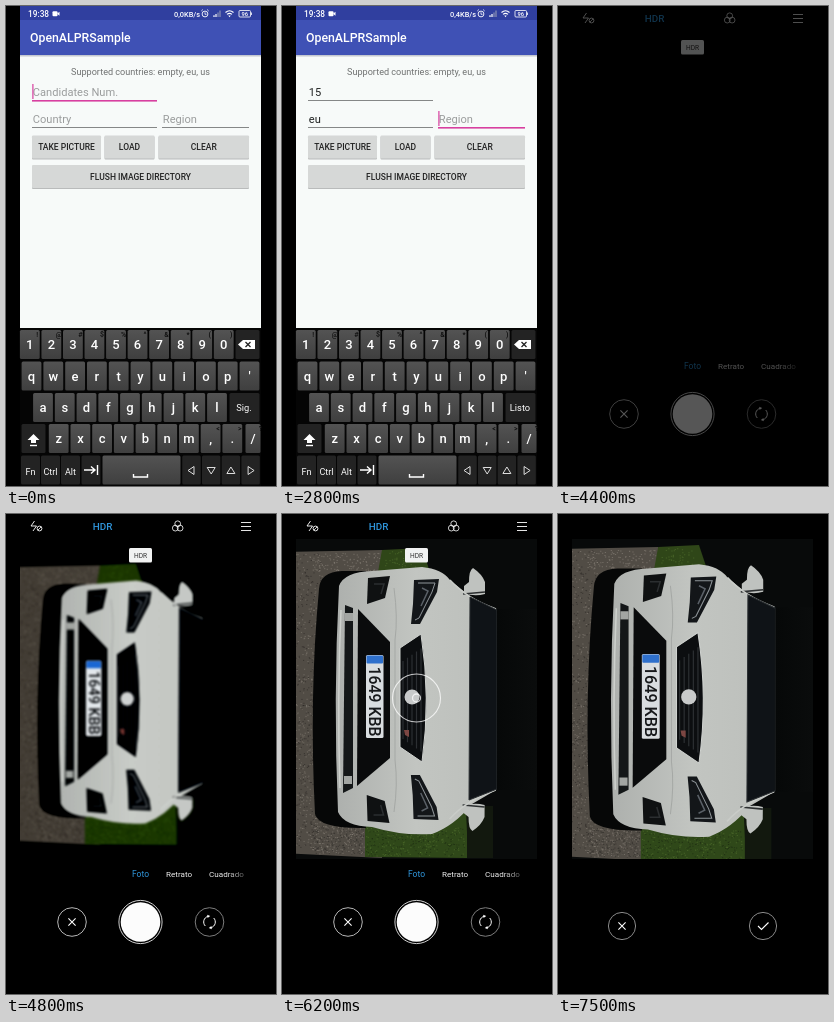
Write an HTML page that moves like this. It is 270 by 480 pixels and loops after 8000 ms.

```html
<!DOCTYPE html>
<html lang="en">
<head>
<meta charset="utf-8">
<title>Plate reader demo</title>
<style>
html, body { margin: 0; width: 100%; height: 100%; overflow: hidden; background: #000; }
svg { display: block; width: 100%; height: 100%; font-family: Roboto, "Noto Sans", sans-serif; }
</style>
</head>
<body>
<svg id="stage" viewBox="0 0 270 480" xmlns="http://www.w3.org/2000/svg"></svg>
<script>
const LOOP = 8000;
const PINK = '#d83fa0', BLUE = '#2f96dc';

const clamp = v => Math.max(0, Math.min(1, v));
const ramp = (t, a, b) => clamp((t - a) / (b - a));
const mix = (a, b, k) => a + (b - a) * k;
const smooth = k => k * k * (3 - 2 * k);

let seed = 7;
const rand = () => (seed = seed * 16807 % 2147483647) / 2147483647;

const rect = (x, y, w, h, fill, more = '') =>
  `<rect x="${x}" y="${y}" width="${w}" height="${h}" fill="${fill}" ${more}/>`;
const text = (x, y, s, size, fill, more = '') =>
  `<text x="${x}" y="${y}" font-size="${size}" fill="${fill}" ${more}>${s}</text>`;
const mid = (x, y, s, size, fill, more = '') => text(x, y, s, size, fill, 'text-anchor="middle" ' + more);
const shape = (d, fill, more = '') => `<path d="${d}" fill="${fill}" ${more}/>`;
const line = (d, stroke, w = 1, more = '') => shape(d, 'none', `stroke="${stroke}" stroke-width="${w}" ${more}`);
const ring = (x, y, r, stroke, w = 1, more = '') =>
  `<circle cx="${x}" cy="${y}" r="${r}" fill="none" stroke="${stroke}" stroke-width="${w}" ${more}/>`;
const group = (id, body, more = '') => `<g id="${id}" ${more}>${body}</g>`;
const bold = 'font-weight="500"';

function specks(n, x, y, w, h, color) {
  let d = '';
  for (let i = 0; i < n; i++) d += `M${(x + rand() * w).toFixed(1)} ${(y + rand() * h).toFixed(1)}h1.2`;
  return line(d, color, 1, 'opacity=".55"');
}

// Form screen
function button(x, y, w, h, label) {
  return rect(x, y + 1, w, h, '#b9bbbb', 'rx="1"') + rect(x, y, w, h, '#d6d8d7', 'rx="1"') +
    mid(x + w / 2, y + h / 2 + 3.2, label, 8.5, '#222', bold);
}

const fields = [
  { x: 26, y: 94, w: 125, hint: 'Candidates Num.' },
  { x: 26, y: 121, w: 125, hint: 'Country' },
  { x: 156, y: 121, w: 87, hint: 'Region' }
];

const field = (f, i) =>
  text(f.x + .8, f.y - 4.5, f.hint, 11.1, '#9b9d9d', `id="value${i}"`) +
  rect(f.x, f.y, f.w, 1, '#858787', `id="under${i}"`);

const form = () =>
  rect(14, 0, 300, 480, '#f7faf9') + rect(14, 0, 300, 14, '#303f9f') + rect(14, 14, 300, 35, '#3f51b5') +
  rect(14, 49, 300, 1.5, '#c4c8d0') +
  text(24, 36, 'OpenALPRSample', 12.3, '#fff', bold) +
  mid(134.5, 69, 'Supported countries: empty, eu, us', 9.1, '#707272') +
  fields.map(field).join('') +
  rect(26, 78, 1.2, 15, PINK, 'id="cursor"') +
  button(26, 129.5, 69, 23, 'TAKE PICTURE') + button(98.5, 129.5, 50, 23, 'LOAD') +
  button(152.5, 129.5, 90.5, 23, 'CLEAR') + button(26, 159, 217, 23, 'FLUSH IMAGE DIRECTORY') +
  group('result', rect(14, 185, 300, 12, '#0e80e6') + text(61, 194, 'Confidence', 9.1, '#12202c'));

// Keyboard
function key(x, y, w, label, o = {}) {
  return rect(x - w / 2, y, w, 29, o.dark ? '#232323' : 'url(#keyFill)', `rx="1.5" ${o.id ? `id="${o.id}"` : ''}`) +
    mid(x, y + 19, label, o.size || 13, '#fff', o.size ? '' : bold) +
    (o.alt ? mid(x + 7.5, y + 6.5, o.alt, 7, '#0c0c0c', bold) : '');
}

const esc = c => ({ '&': '&amp;', '<': '&lt;', '>': '&gt;' })[c] || c;
const row = (chars, x, y, step, alts = '') => [...chars].map((c, i) =>
  key(x + i * step, y, 19.8, c, { id: 'key' + c.charCodeAt(0), alt: esc(alts[i] || '') })).join('');

function keyboard() {
  const small = { dark: true, size: 9 };
  const arrows = ['-3.5 0l6-4v8z', '-4 -3h8l-4 6.5z', '-4 3h8l-4-6.5z', '3.5 0l-6-4v8z'];
  return rect(14, 322, 241, 158, '#050505') +
    row('1234567890', 23.8, 324, 21.55, '!@#$%^&*()') + key(241.5, 324, 24, '', { dark: true }) +
    shape('M232 338.5l5-4.5h12v9h-12z', '#fff') + line('M239.5 336l5 5m0-5l-5 5', '#222', 1.3) +
    row("qwertyuiop'", 25.5, 355.5, 21.8) +
    row('asdfghjkl', 37, 387, 21.75) + key(238.5, 387, 30, '', small) +
    mid(238, 405, 'Sig.', 9.3, '#fff', 'id="action"') +
    key(27.5, 418, 24, '', { dark: true }) + shape('M27.5 428l6 6h-3.5v3h-5v-3h-3.5z', '#fff') +
    line('M24 439.5h7', '#fff', 1.4) +
    row('zxcvbnm,.', 52.7, 418, 21.7, '       <>') + key(247, 418, 15, '/', { alt: '?' }) +
    key(24.5, 449.5, 19, 'Fn', small) + key(44.5, 449.5, 19, 'Ctrl', small) +
    key(64.5, 449.5, 19, 'Alt', small) + key(85, 449.5, 19, '', small) +
    line('M78 464h11m-4-3.5l4 3.5l-4 3.5M91.5 459v10', '#fff', 1.4) +
    key(135.5, 449.5, 78, '') + line('M127.5 468v3h14v-3', '#fff', 1.4) +
    arrows.map((a, i) => key(185.5 + i * 19.7, 449.5, 18.5, '', small) +
      line('M' + a, '#ddd', 1, `transform="translate(${185.5 + i * 19.7} 464.5)"`)).join('');
}

const statusBar = () =>
  text(22, 10.7, '19:38', 8.3, '#fff', bold) +
  rect(46.5, 5.2, 5, 5, '#fff', 'rx="1"') + shape('M51 7.7l2.5-2v4z', '#fff') +
  text(168, 10.5, '', 7.4, '#fff', bold + ' id="speed"') +
  ring(199, 8, 2.9, '#fff', .9) + line('M199 6.3v2h1.5M195.3 5l1.6-1.5M202.7 5l-1.6-1.5', '#fff', .8) +
  line('M208 11v-1.8M210 11v-3', '#fff', 1.2) + line('M212 11v-4.6M214 11v-6.5', '#8c92b4', 1.2) +
  line('M219.5 6.5q4-3.5 8 0M221 8.4q2.5-2 5 0', '#fff', 1.1) + shape('M222.3 9.6h2.4l-1.2 1.6z', '#fff') +
  line('M234 4.5h9.5q1 0 1 1v4.5q0 1-1 1h-9.5q-1 0-1-1v-4.5q0-1 1-1zM245.5 6.5v2.5', '#fff', .8) +
  mid(238.8, 9.9, '96', 5.8, '#fff', bold);

// Car seen through the camera, lying on its side
function corner(flip) {
  const body = shape('M132 66L157 65L155 78L138 110L129 110L131 90Z', '#131619') +
    line('M136 69L153 69L150 78L137 104L133 106', '#8f9599', 1) +
    line('M140 74l6 3l-7 15', '#5a6067', 1.5) +
    shape('M86 64L108 62L103 84L85 90Z', '#0f1112') + line('M92 70h10l-3 10', '#2b2e30', 1.5) +
    shape('M182 72L187 68Q187 56 191 54Q200 60 203 68L203 80Q192 83 182 79Z', '#bfc2bf') +
    line('M181 80l22-2', '#2c2f30', 1.5) +
    line('M168 66Q184 84 214 95', '#c9ccc8', 1.5);
  return flip ? `<g transform="matrix(1 0 .008 -1 -1 371)">${body}</g>` : body;
}

function scene() {
  let slots = '';
  for (let x = 121; x < 141; x += 4.5) slots += `M${x} ${147 - (x - 121) * .7}V${225 + (x - 121) * .7}`;
  return rect(-40, -20, 360, 420, '#080a0a') +
    shape('M-40 39L100 36V344L-40 337Z', '#514c45') +
    specks(700, -20, 40, 60, 297, '#8a847a') + specks(700, -20, 40, 60, 297, '#25221f') +
    specks(160, 30, 312, 52, 28, '#8f887e') + specks(160, 30, 312, 52, 28, '#2b2825') +
    specks(110, 30, 39, 68, 18, '#8f887e') +
    shape('M100 36L140 34L148 58H96Z', '#2f4618') +
    shape('M83 308H160L184 292L186 344L83 343Z', '#2f4819') +
    specks(170, 84, 314, 98, 28, '#567630') + specks(170, 84, 314, 98, 28, '#182610') +
    specks(40, 102, 37, 34, 16, '#567630') +
    shape('M185 292H211V344H185Z', '#12180e') +
    shape('M60 57Q38 58 37 75Q27 182 33 300Q37 315 84 314V57Z', '#060707') +
    shape('M57 72Q62 58 90 57L140 53Q160 55 168 66L190 84L214 96V276L190 290Q172 312 150 320Q120 322 90 313Q62 312 56 298Q51 185 57 72Z', 'url(#paint)') +
    shape('M63 91L71 94V274L61 279Z', '#141718') +
    rect(63, 99, 8, 8, '#a2a5a2') + rect(62, 262, 8, 8, '#a2a5a2') +
    line('M59 96Q55 185 58 274', '#cdd0cc', 1.5) +
    shape('M76 95L108 128V244L75 272Z', '#0a0b0c') +
    line('M112 74Q116 104 113 126V246Q116 270 112 298', '#a5a8a5', 1) +
    shape('M118 134L139 120Q149 184 140 248L118 233Z', '#0c0e10', 'stroke="#d0d3d0" stroke-width="1"') +
    line(slots, '#2c2f32', 1.2) + shape('M122 216h5v7l-4-2z', '#7c4642') +
    '<circle cx="130" cy="183" r="7.5" fill="#c8caca"/>' +
    corner() + corner(true) +
    shape('M188 83L215 96V275L187 286Z', '#0f1317', 'stroke="#2a2e31"') +
    shape('M215 95H330V276H215Z', 'url(#roof)') +
    rect(84, 141, 17.5, 83, '#d9dde0', 'rx="1.5"') + rect(84.5, 141.5, 16.5, 8, '#2f70cc', 'rx="1"') +
    mid(0, 0, '1649 KBB', 15.8, '#17191b', `${bold} transform="translate(87.2 187.5) rotate(90)"`);
}

const tick = (x, y) => line(`M${x - 5} ${y}l3.5 3.5l7-7`, '#fff', 1.1);
const cross = (x, y) => line(`M${x - 3.6} ${y - 3.6}l7.2 7.2m0-7.2l-7.2 7.2`, '#fff', 1.1);

const controls = () =>
  line('M28.5 7l-3.5 5h5.5l-3.5 5', '#fff', .9) + ring(33.5, 14.5, 2.4, '#fff', .9) + line('M31.8 16.2l3.4-3.4', '#fff', .8) +
  text(86.7, 15.8, 'HDR', 9.9, BLUE, bold) +
  [[171.7, 9.8], [169.3, 14.1], [174.1, 14.1]].map(p => ring(p[0], p[1], 2.9, '#fff', .8)).join('') +
  line('M235 8.5h10M235 12.5h10M235 16.5h10', '#e4e4e4', 1) +
  rect(123, 34, 23, 14.5, '#f1f2f2', 'rx="1.5"') + mid(134.5, 43.7, 'HDR', 6.6, '#333') +
  text(126, 363, 'Foto', 8.5, BLUE) + text(160, 363, 'Retrato', 8.1, '#eee') +
  text(203, 363, 'Cuadrado', 8.1, 'url(#fade)') +
  ring(66, 408, 14.3, '#b5b5b5') + cross(66, 408) +
  group('shutter', ring(0, 0, 21.6, '#e4e4e4', .9) + '<circle r="19.8" fill="#fcfcfc"/>') +
  ring(203.5, 408, 14.3, '#7c7c7c') +
  line('M199.3 412a5.8 5.8 0 0 1 2.6-9.6M207.7 404a5.8 5.8 0 0 1-2.6 9.6', '#fff', 1) +
  shape('M201.2 400.8l3 1.3l-2.6 2zM205.8 415.2l-3-1.3l2.6-2z', '#fff');

const stage = document.getElementById('stage');
stage.innerHTML = `<defs>
  <linearGradient id="keyFill" x2="0" y2="1"><stop stop-color="#535353"/><stop offset="1" stop-color="#3f3f3f"/></linearGradient>
  <linearGradient id="paint"><stop stop-color="#adb0ad"/><stop offset=".5" stop-color="#c2c5c1"/><stop offset="1" stop-color="#bcbfbb"/></linearGradient>
  <linearGradient id="roof"><stop stop-color="#060808"/><stop offset=".4" stop-color="#0b0d0d"/></linearGradient>
  <linearGradient id="fade"><stop offset=".5" stop-color="#eee"/><stop offset="1" stop-color="#555"/></linearGradient>
  <clipPath id="view"><rect x="14" y="25" width="241" height="320"/></clipPath></defs>` +
  rect(0, 0, 270, 480, '#000') +
  group('app', form()) + rect(14, 0, 241, 480, '#000', 'id="dim"') +
  rect(255, 0, 300, 480, '#000', 'id="cover"') + rect(0, 0, 14, 480, '#000') +
  group('keys', keyboard()) + group('status', statusBar()) +
  group('camera', rect(0, 0, 270, 480, '#000') +
    `<g clip-path="url(#view)">${group('preview', group('scene', scene()))}</g>` +
    group('focus', '<circle id="halo" fill="none" stroke="#fff" stroke-width="1.1"/>' + ring(134.5, 184, 4, '#fff', 1.3)) +
    group('controls', controls()) +
    group('review', ring(64, 412, 13.6, '#8a8a8a') + cross(64, 412) + ring(205, 412, 13.6, '#8a8a8a') + tick(205, 412)));

const el = {};
stage.querySelectorAll('[id]').forEach(n => el[n.id] = n);
const set = (id, attrs) => { for (const k in attrs) el[id].setAttribute(k, attrs[k]); };
const show = (id, on) => set(id, { opacity: +on });

const presses = [['1', 100], ['5', 300], ['e', 1600], ['u', 1800]];
const cursorResets = [0, 200, 400, 900, 1700, 1900, 2200, 2800];

function drawForm(t) {
  const typed = [t < 200 ? '' : t < 400 ? '1' : '15', t < 1700 ? '' : t < 1900 ? 'e' : 'eu', ''];
  const active = t < 900 ? 0 : t < 2200 ? 1 : 2;
  fields.forEach((f, i) => {
    el['value' + i].textContent = typed[i] || f.hint;
    set('value' + i, { fill: typed[i] ? '#202222' : '#9b9d9d' });
    set('under' + i, i === active ? { fill: PINK, height: 1.6 } : { fill: '#858787', height: 1 });
  });
  const f = fields[active];
  set('cursor', { x: f.x + .3 + typed[active].length * 6.2, y: f.y - 16 });
  const last = cursorResets.filter(c => c <= t).pop();
  show('cursor', (t - last) % 1000 < 500);

  presses.forEach(([c, at]) =>
    set('key' + c.charCodeAt(0), { fill: t >= at && t < at + 100 ? '#858585' : 'url(#keyFill)' }));
  el.action.textContent = t < 900 ? 'Sig.' : 'Listo';
  el.speed.textContent = t < 500 ? '0,0KB/s' : '0,4KB/s';
  show('result', t >= 3700);

  const p = 1 - Math.pow(1 - ramp(t, 3700, 4150), 3.54);
  set('app', { transform: `translate(${-55 * p} 0)` });
  set('dim', { opacity: .35 * p });
  set('cover', { x: 255 - 241 * p });
  set('keys', { transform: `translate(0 ${160 * smooth(ramp(t, 4000, 4250))})` });
  show('status', t < 4300);
}

function drawCamera(t) {
  show('camera', t >= 4300);
  set('controls', { opacity: ramp(t, 4350, 4500) * (1 - ramp(t, 7280, 7400)) });
  show('review', t >= 7500);

  // The preview starts smaller, soft and contrasty, then settles in focus
  const k = smooth(ramp(t, 4800, 5500)), sharp = smooth(ramp(t, 5100, 5650));
  const zoom = t >= 7300 ? 1.02 : 1;
  const sx = mix(.9, 1, k) * zoom, sy = mix(.91, 1, k) * zoom;
  set('scene', { transform: `translate(${mix(87, 92, k)} ${mix(188, 186.5, k)}) scale(${sx} ${sy}) translate(-92 -186.5)` });
  el.preview.style.filter = sharp < 1
    ? `blur(${1.3 * (1 - sharp)}px) contrast(${mix(1.25, 1, sharp)}) brightness(${mix(.95, 1, sharp)})` : 'none';
  set('preview', { opacity: ramp(t, 4450, 4650) });

  set('focus', { opacity: .75 * ramp(t, 5650, 5800) * (1 - ramp(t, 6400, 6600)) });
  set('halo', { cx: 134.5, cy: 184, r: mix(32, 24, smooth(ramp(t, 5650, 5900))) });
  const push = Math.sin(Math.PI * ramp(t, 5500, 5750));
  set('shutter', { transform: `translate(134.5 408) scale(${1 - .07 * push})` });
}

function draw(t) {
  drawForm(t);
  drawCamera(t);
}

const start = performance.now();
function frame() {
  draw((performance.now() - start) % LOOP);
  requestAnimationFrame(frame);
}
draw(0);
requestAnimationFrame(frame);
</script>
</body>
</html>
```
